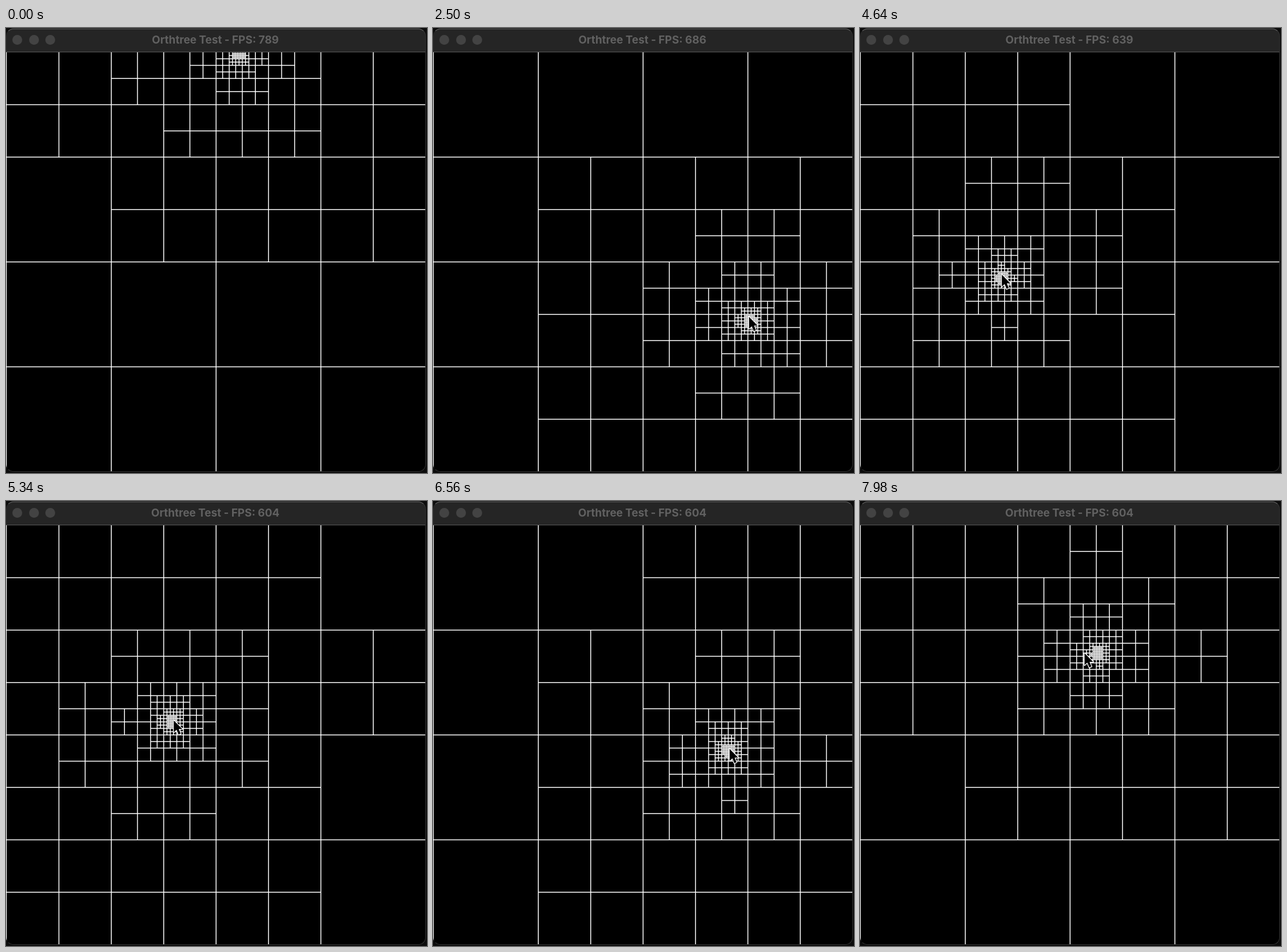
Write an HTML page with a canvas that moves like this. It is 728 px wide and 769 px high and loops after 8 s.

```html
<!DOCTYPE html>
<html lang="en">
<head>
<meta charset="utf-8">
<title>Orthtree Test</title>
<style>
  html, body { margin: 0; width: 100%; height: 100%; overflow: hidden; background: #0c0c0c; }
  #stage { position: relative; width: 728px; height: 769px; overflow: hidden; }
  #window {
    position: absolute; left: 0; top: 1px; width: 726px; height: 766px;
    background: #000; border-radius: 13px; overflow: hidden;
  }
  #view { position: absolute; left: 0; top: -1px; }
  #bar {
    position: absolute; left: 0; top: 0; width: 100%; height: 41px;
    background: #252525; box-shadow: inset 0 -1px #585858;
  }
  #bar i {
    position: absolute; top: 11px; width: 17px; height: 17px;
    border-radius: 50%; background: #434343;
  }
  #title {
    position: absolute; left: 0; top: 0; width: 724px; text-align: center;
    white-space: pre; color: #616161; font: 700 18.7px/39px Inter, sans-serif;
  }
  #edge {
    position: absolute; left: 0; top: 1px; width: 726px; height: 766px; box-sizing: border-box;
    border: 1px solid #333; border-top-color: #666; border-left-color: transparent;
    border-radius: 13px;
  }
</style>
</head>
<body>
<div id="stage">
  <div id="window">
    <canvas id="view" width="728" height="769"></canvas>
    <div id="bar">
      <i style="left:11px"></i><i style="left:39.5px"></i><i style="left:68px"></i>
      <div id="title"></div>
    </div>
  </div>
  <div id="edge"></div>
</div>
<script>
const LOOP = 8000, LEFT = 0.9, TOP = 41.9, SIZE = 724.8;
const MAX_DEPTH = 8, LINE = 1.5, LEAD = 22, ENTER = 700;
const FPS = [789, 686, 639, 604], FPS_FIRST = 140, FPS_STEP = 2380;

const key = (t, x, y) => ({ t, x, y });
const hold = (from, to, x, y) => [key(from, x, y), key(to, x, y)];

// The pointer drops to the lower right, rests, then circles back.
const path = [
  ...hold(0, ENTER, 403, 43.8),
  ...hold(980, 1700, 648.4, 703.1),
  ...hold(2660, 3240, 540, 490),
  key(3620, 388, 587.6),
  key(4640, 246, 431.6),
  key(5340, 286.4, 381.6),
  key(6560, 510.5, 431.3),
  key(7500, 480, 360),
  key(7980, 411.5, 263.6),
  key(8100, 230, 300)
];

const ctx = document.getElementById('view').getContext('2d');
const title = document.getElementById('title');
const arrow = new Path2D('M0 0V20.5L4.8 16.2L8.2 24.5L12 22.9L8.6 14.9H14.8Z');

const still = (a, b) => a.x === b.x && a.y === b.y;

function slope(i, axis) {
  const a = path[i - 1], b = path[i], c = path[i + 1];
  if (!a || !c || still(a, b) || still(b, c)) return 0;
  return (c[axis] - a[axis]) / (c.t - a.t);
}

// Smooth cubic curve through the keys.
function pointer(t) {
  const i = path.findIndex(k => k.t > t) - 1;
  const a = path[i], b = path[i + 1], span = b.t - a.t;
  const u = (t - a.t) / span, v = 1 - u;
  const at = axis =>
    a[axis] * v * v * (1 + 2 * u) + b[axis] * u * u * (1 + 2 * v) +
    span * u * v * (slope(i, axis) * v - slope(i + 1, axis) * u);
  return [at('x'), at('y')];
}

// Split every cell whose centre is within two cell sizes of the pointer.
function drawCell(x, y, size, depth, mx, my) {
  const half = size / 2, cx = x + half, cy = y + half;
  if (depth === MAX_DEPTH || Math.hypot(cx - mx, cy - my) >= 2 * size) return;
  ctx.fillRect(cx - LINE / 2, y, LINE, size);
  ctx.fillRect(x, cy - LINE / 2, size, LINE);
  for (const qx of [x, cx])
    for (const qy of [y, cy]) drawCell(qx, qy, half, depth + 1, mx, my);
}

function drawCursor(x, y) {
  ctx.save();
  ctx.translate(x + 0.5, y - 2.5);
  ctx.lineJoin = 'round';
  ctx.lineWidth = 2.6;
  ctx.strokeStyle = '#fff';
  ctx.stroke(arrow);
  ctx.fillStyle = '#000';
  ctx.fill(arrow);
  ctx.restore();
}

function draw(t) {
  ctx.clearRect(0, 0, 728, 769);
  ctx.fillStyle = '#fff';
  ctx.fillRect(0, TOP, 1.2, SIZE);
  drawCell(LEFT, TOP, SIZE, 0, ...pointer(t));
  if (t >= ENTER) drawCursor(...pointer(t + LEAD));

  const step = Math.floor((t - FPS_FIRST) / FPS_STEP) + 1;
  const text = 'Orthtree Test - FPS: ' + FPS[Math.min(step, FPS.length - 1)];
  if (title.textContent !== text) title.textContent = text;
}

const start = performance.now();
function frame(now) {
  draw(Math.max(0, now - start) % LOOP);
  requestAnimationFrame(frame);
}
frame(start);
</script>
</body>
</html>
```
